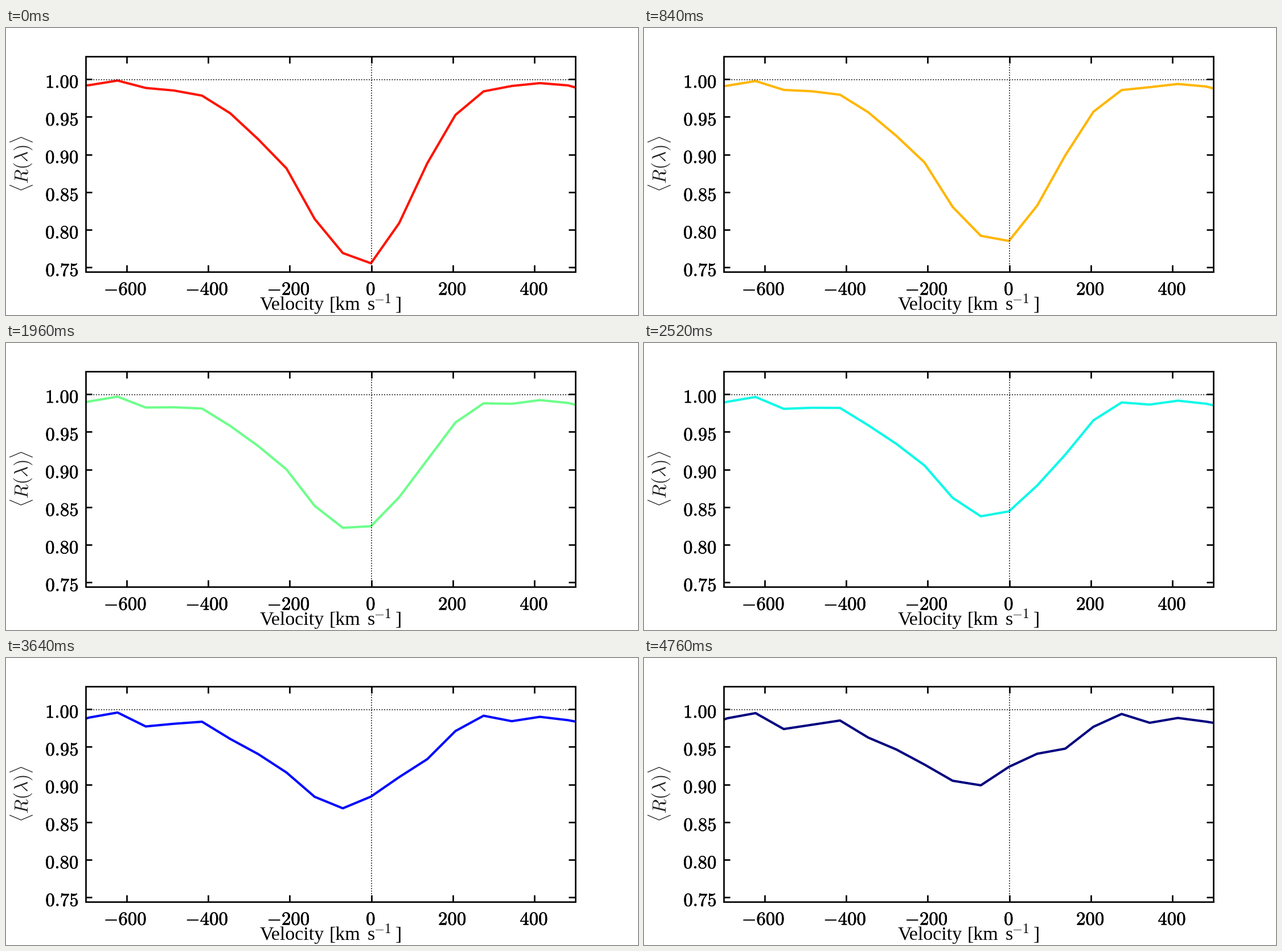
These frames come from a looping animation (1110x505 px, 4.9 s). A matplotlib script:

```python
import matplotlib.pyplot as plt
import numpy as np
from matplotlib.animation import FuncAnimation
from matplotlib.patches import Rectangle
from matplotlib.patheffects import withStroke

W, H, DPI = 1110, 505, 80
FRAMES, STEP = 35, 140
PT = 72 / DPI  # points per pixel
LEFT, RIGHT, TOP, BOTTOM = 139.5, 999.5, 50, 428.5
X0, Y1 = 641.5, 90  # pixel places of velocity 0 and value 1.00

plt.rcParams["mathtext.fontset"] = "cm"
fig = plt.figure(figsize=(W / DPI, H / DPI), dpi=DPI, facecolor="white")
ax = fig.add_axes([0, 0, 1, 1])
ax.set(xlim=(0, W), ylim=(H, 0))
ax.axis("off")


def stroke(xs, ys, width=2.7, **kw):
    kw = {"color": "black", "solid_capstyle": "butt", "zorder": 4} | kw
    return ax.plot(xs, ys, lw=width * PT, **kw)[0]


def label(x, y, s, size, color="black", bold=0.0, **kw):
    kw = {"va": "baseline", "ha": "left"} | kw
    t = ax.text(x, y, s, fontsize=size * PT, color=color, **kw)
    if bold:
        t.set_path_effects([withStroke(linewidth=bold * PT, foreground=color)])


# Frame, ticks and tick labels
ax.add_patch(Rectangle((LEFT, TOP), RIGHT - LEFT, BOTTOM - TOP, fill=False,
                       ec="black", lw=2.7 * PT, zorder=4))
for v in range(-600, 401, 200):
    x = X0 + v * 0.7165
    stroke([x, x], [TOP, TOP + 11.5])
    stroke([x, x], [BOTTOM, BOTTOM - 11.5])
    label(x - (2 if v < 0 else 0.8), 469.5, f"${v}$", 32.8, bold=0.6, ha="center")
for i in range(6):
    y = Y1 + 66.25 * i
    stroke([LEFT, LEFT + 11.5], [y, y])
    stroke([RIGHT, RIGHT - 11.5], [y, y])
    label(128, y + 15.2, f"${1 - 0.05 * i:.2f}$", 32.8, bold=0.6, ha="right")

# Dotted guides
dots = dict(dashes=(1.1, 1.7), zorder=3, dash_capstyle="butt")
stroke([LEFT, RIGHT], [Y1 + 0.5, Y1 + 0.5], 1.6, **dots)
stroke([X0, X0], [BOTTOM, TOP], 1.6, **dots)

# Axis titles
for x, s in ((446, "Velocity"), (568, "[km"), (635, "s")):
    label(x, 496, s, 34, family="Liberation Serif")
label(646.5, 484, "$-1$", 23.5)
label(684, 496, "]", 34, family="Liberation Serif")
label(28, 239, r"$\langle R(\lambda)\rangle$", 33, "#222222",
      rotation=90, va="center", ha="center")

# The profile slides evenly from a deep dip to a shallow one
xs = np.r_[LEFT, 641 + 49.45 * np.arange(-10, 8), RIGHT]
deep = np.array([101, 100.5, 92.5, 105.5, 110, 119, 150, 196, 247, 336, 396,
                 414, 343.5, 238, 153, 111.5, 102, 97, 101, 104.5])
flat = np.array([108.5, 106, 97, 125, 117.5, 110, 140, 161, 187.5, 216, 224,
                 191.5, 168.5, 159.5, 121, 98.5, 114, 105.5, 112, 114])
curve = stroke(xs, deep, 4.1, zorder=2, solid_joinstyle="round")


def draw(i):
    t = i / (FRAMES - 1)
    curve.set_ydata(deep + (flat - deep) * t)
    curve.set_color(plt.cm.jet(max(0.0, 0.89 - 0.986 * t)))
    return (curve,)


anim = FuncAnimation(fig, draw, frames=FRAMES, interval=STEP, repeat=True,
                     repeat_delay=0, blit=False)
plt.show()
```
